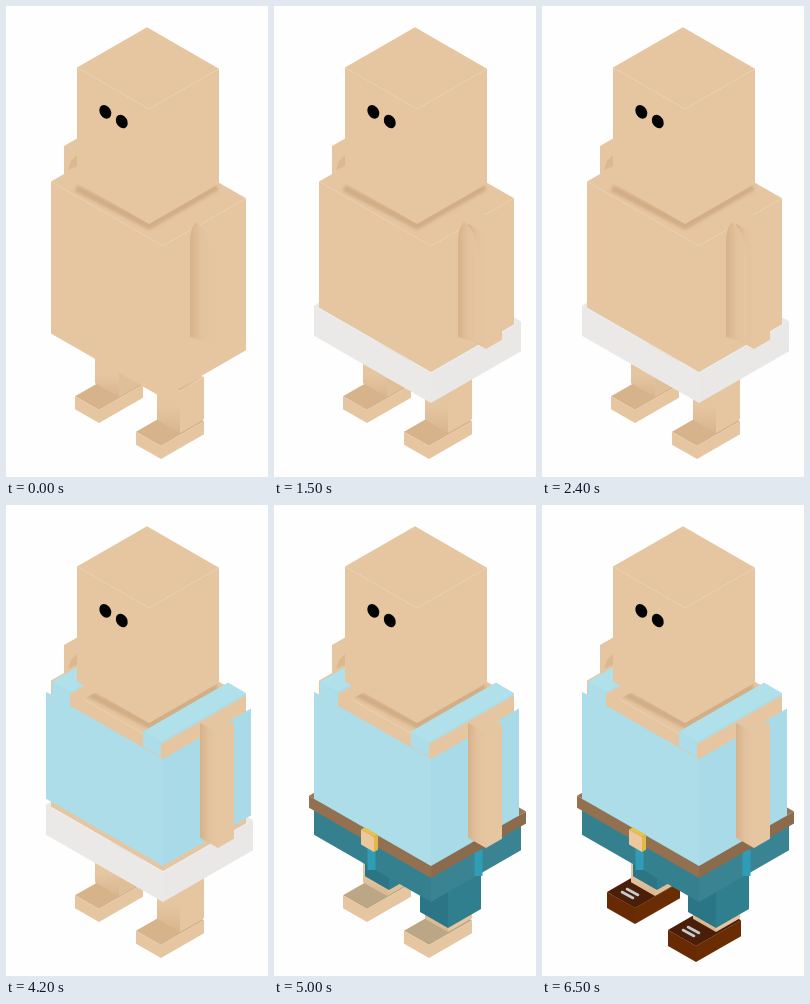
These frames come from a looping animation (262 px wide and 471 px high, 8000 ms). An HTML page:

```html
<!DOCTYPE html>
<html>
<head>
<meta charset="utf-8">
<style>
html, body { margin: 0; width: 100%; height: 100%; overflow: hidden; background: #fefefe }
svg { display: block; width: 262px; height: 471px }
</style>
</head>
<body>
<svg viewBox="0 0 262 471">
  <defs>
    <filter id="soft" x="-50%" y="-50%" width="200%" height="200%"><feGaussianBlur stdDeviation="1.5"/></filter>
    <linearGradient id="limb"><stop stop-color="#d6b28a"/><stop offset=".5" stop-color="#e2c29c"/><stop offset="1" stop-color="#e5c6a1"/></linearGradient>
    <linearGradient id="shin" x2="0" y2="1"><stop offset=".5" stop-color="#e5c6a1"/><stop offset="1" stop-color="#d8b58d"/></linearGradient>
  </defs>
  <g id="figure"></g>
</svg>
<script>
const LOOP = 8000, SLOPE = 0.575;
const SHORTS = 1500, SHIRT = 3000, TROUSERS = 5000, SHOES = 6500;
const SKIN = '#e5c6a1', SHADE = '#d1ad85', SHIRT_BLUE = '#acdde8';
const root = document.getElementById('figure');
const layers = [];

// Visible from one time up to another; painted in call order.
function layer(from, to, ...shapes) {
  const g = document.createElementNS('http://www.w3.org/2000/svg', 'g');
  g.innerHTML = shapes.join('');
  root.append(g);
  layers.push({ g, from, to });
}

const poly = (points, fill) => `<path d="M${points.join('L')}Z" fill="${fill}"/>`;
const line = (d, color, width, extra = '') =>
  `<path d="${d}" fill="none" stroke="${color}" stroke-width="${width}" ${extra}/>`;

// Isometric box: (x, y) is the top of its front edge, l and r its widths on screen.
function box(x, y, l, r, h, left, right = left, top = left) {
  const at = (a, b, drop = 0) => [x - a + b, y - (a + b) * SLOPE + drop];
  return poly([at(0, 0), at(l, 0), at(l, r), at(0, r)], top) +
    poly([at(0, 0), at(l, 0), at(l, 0, h), at(0, 0, h)], left) +
    poly([at(0, 0), at(0, r), at(0, r, h), at(0, 0, h)], right);
}

// feet, shoes and legs
for (const [from, to, top] of [[0, TROUSERS, '#d6b38b'], [TROUSERS, LOOP, '#bba785']])
  layer(from, to,
    box(93, 404, 24, 44, 13, SKIN, SKIN, top),
    box(155, 440, 25, 43, 13, SKIN, SKIN, top));

const shoe = (x, y) => box(x, y, 28, 45, 16, '#672a03', '#6a2c02', '#4a1e08') +
  [0, 5].map(d => line(`M${x - 13 + d} ${y - 16 - d * .6}l11 6`, '#c3ccd0', 2.6, 'stroke-linecap="round"')).join('');
layer(SHOES, LOOP, shoe(93, 403), shoe(154, 441));

layer(0, LOOP,
  box(113, 360, 24, 24, 31, 'url(#shin)', '#dfbf98'),
  box(174, 385, 23, 24, 42, 'url(#shin)', SKIN));

// trousers and belt
layer(TROUSERS, LOOP,
  box(115, 360, 24, 23, 25, '#2a7686', '#2f7f8f'),
  box(174, 380, 28, 33, 43, '#2a7686', '#2f7f8f'),
  box(157, 366, 117, 90, 31, '#35808f', '#3a8393'),
  line('M97.5 341V365M204.5 345V371', '#2f9db5', 8),
  box(157, 361, 122, 95, 12, '#93704f', '#8c6b4d', '#99755a'));

layer(SHORTS, TROUSERS, box(157, 367, 117, 90, 30, '#ebe9e8', '#e9e8e7'));

// torso, shorter once something is worn below it
layer(0, LOOP,
  box(58, 140, 0, 14, 30, SKIN),
  poly([[71, 149], [65, 155], [62, 164], [71, 160]], '#dbb990'));
for (const [from, to, h] of [[0, SHORTS, 152], [SHORTS, TROUSERS, 126], [TROUSERS, LOOP, 118]])
  layer(from, to, box(157, 240, 112, 83, h, SKIN));

// shirt, open at the top
layer(SHIRT, LOOP,
  box(157, 254, 117, 88, 107, SHIRT_BLUE, '#a8dbe7', 'none'),
  line('M190 246V330', '#85b8c0', 6, 'filter="url(#soft)" opacity=".6"'));

layer(0, LOOP,
  line('M70 182L143 220L211 181', '#cba57d', 7, 'filter="url(#soft)" opacity=".75"'));

// arm and straps
const strap = (x, y) => box(x, y, 18, 85, 15, SHIRT_BLUE, SKIN, '#b0e0ea') +
  box(x, y, 18, 85, 2, SHIRT_BLUE, SHIRT_BLUE, '#b0e0ea');
layer(SHIRT, LOOP, strap(64, 187), strap(155, 237));
layer(SHORTS, LOOP, box(212, 228, 18, 16, 115, 'url(#limb)', SKIN, SKIN));
layer(0, SHIRT,
  '<path d="M184 331V236Q184 222 190 216Q201 222 205 250V337Z" fill="url(#limb)"/>');

// buckle
layer(TROUSERS, LOOP, box(100, 332, 13, 4, 15, '#ecc99c', '#e5b843', '#e8c04f'));

// head
const eye = (x, y) =>
  `<ellipse cx="${x}" cy="${y}" rx="5.5" ry="7.2" transform="rotate(-30 ${x} ${y})" fill="#030303"/>`;
layer(0, LOOP, box(143, 103, 72, 70, 115, SKIN), eye(99.3, 105.8), eye(115.8, 115.5));

const start = performance.now();
function draw() {
  const t = (performance.now() - start) % LOOP;
  for (const { g, from, to } of layers)
    g.style.display = t >= from && t < to ? '' : 'none';
  requestAnimationFrame(draw);
}
draw();
</script>
</body>
</html>
```
